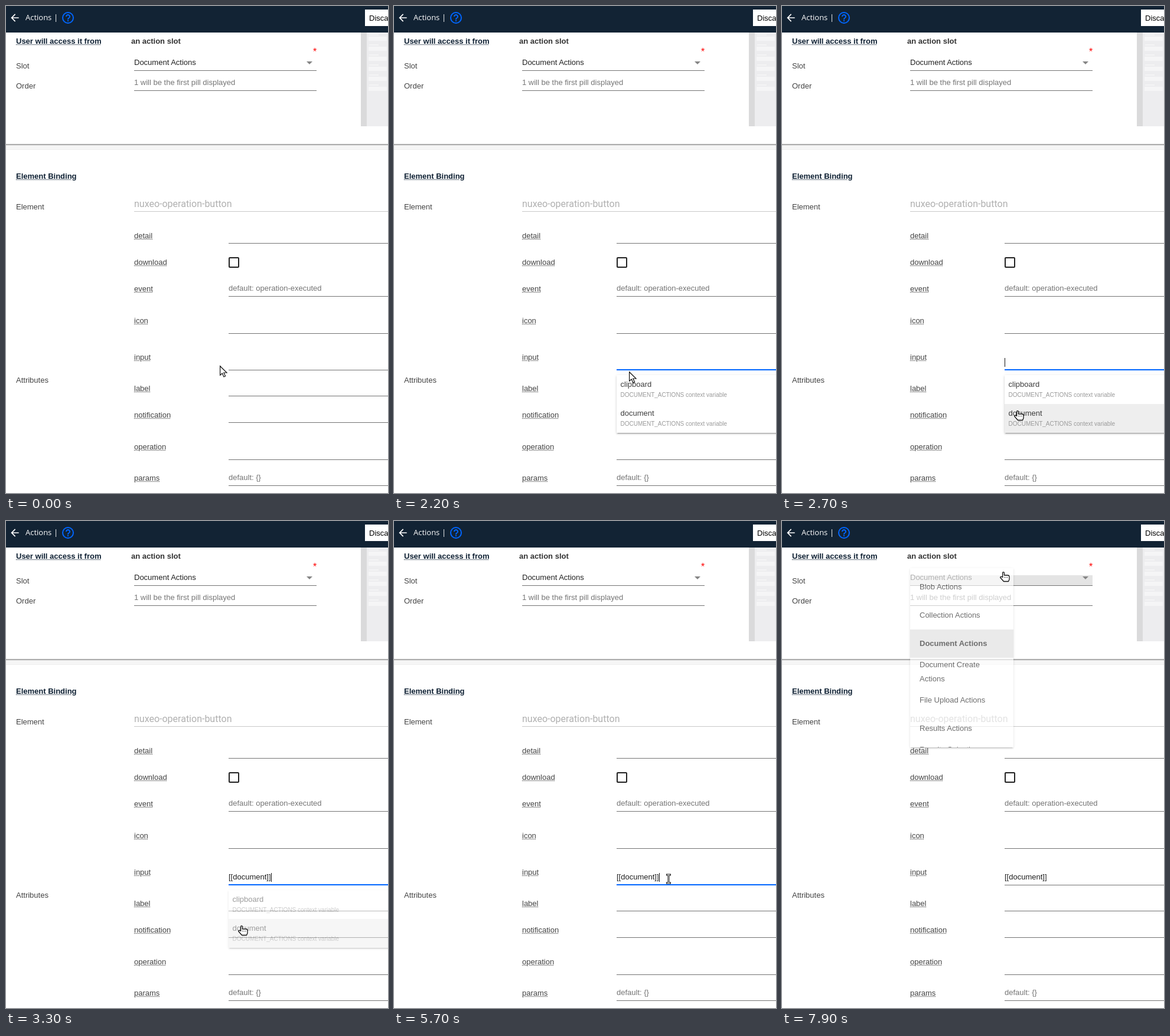
Write an HTML page that moves like this. It is 647 px wide and 826 px high and loops after 8 s.

```html
<!DOCTYPE html>
<html lang="en">
<head>
<meta charset="utf-8">
<title>Action slot form</title>
<style>
html, body { margin: 0; width: 100%; height: 100%; overflow: hidden; background: #fff; }
#stage { position: relative; width: 647px; height: 826px; overflow: hidden;
  font: 13px/15px "Liberation Sans", Arial, sans-serif; color: #444; }
#stage div, #stage svg { position: absolute; }
.text { white-space: nowrap; }
.head { font-weight: bold; color: #0e2033; }
.abbr { text-decoration: underline dotted; }
.hint { color: #757575; }
.value { color: #212121; }
.small { font-size: 10px; color: #9a9a9a; }
.shadow { box-shadow: 0 2px 2px rgba(0,0,0,.14), 0 1px 5px rgba(0,0,0,.12), 0 3px 1px -2px rgba(0,0,0,.2); }
#popup { left: 377px; top: 626px; width: 400px; height: 98px; background: #fff; color: #3c3c3c; }
#menu { left: 217px; top: 80px; width: 175px; height: 304px; overflow: hidden;
  background: #fff; color: #212121; opacity: .65; }
#menu p { margin: 0; padding: 0 16px; height: 48px; line-height: 24px; display: flex; align-items: center; }
#menu p:first-child { margin-top: 8px; }
#menu .chosen { background: #e0e0e0; font-weight: bold; }
</style>
</head>
<body>
<div id="stage"></div>
<script>
const stage = document.getElementById('stage');

function add(html, parent = stage) {
  parent.insertAdjacentHTML('beforeend', html);
  return parent.lastElementChild;
}
function box(x, y, w, h, color, parent, style = '') {
  return add(`<div style="left:${x}px;top:${y}px;width:${w}px;height:${h}px;background:${color};${style}"></div>`, parent);
}
function text(x, baseline, str, cls = '', parent, style = '') {
  return add(`<div class="text ${cls}" style="left:${x}px;top:${baseline - 12}px;${style}">${str}</div>`, parent);
}
function show(el, on) { el.style.display = on ? '' : 'none'; }

// Header
box(0, 0, 647, 45, '#122334');
add(`<svg width="130" height="45">
  <path transform="translate(5 10) scale(.833)" fill="#fff" d="M20 11H7.83l5.59-5.59L12 4l-8 8 8 8 1.41-1.41L7.83 13H20v-2z"/>
  <circle cx="105" cy="20" r="9" fill="none" stroke="#06f" stroke-width="2"/>
  <path fill="#06f" transform="translate(93 8)" d="M11 18h2v-2h-2zM12 6c-2.21 0-4 1.79-4 4h2c0-1.1.9-2 2-2s2 .9 2 2c0 2-3 1.75-3 5h2c0-2.25 3-2.5 3-5 0-2.21-1.79-4-4-4z"/>
</svg>`);
const bar = 'color:#fff;font-family:"Open Sans","Noto Sans",sans-serif'.replace(/"/g, "'");
text(33, 24, 'Actions', '', stage, bar);
text(81, 24, '|', '', stage, bar);
box(608, 6, 60, 28, '#fff');
text(615, 25, 'Discard', '', stage, 'color:#000');

// Slot section
text(17, 64, 'User will access it from', 'head abbr');
text(212, 64, 'an action slot', 'head', stage, 'color:#333');
text(520, 82, '*', '', stage, 'color:#f00;font-size:16px');
text(17, 106, 'Slot');
text(17, 140, 'Order');
const ripple = box(217, 92, 309, 17, '#e4e4e4');
text(217, 100, 'Document Actions', 'value');
text(217, 134, '1 will be the first pill displayed', 'hint');
box(217, 109, 309, 1, '#737373');
box(217, 143, 309, 1, '#737373');
add('<svg style="left:509px;top:94px" width="10" height="5"><path d="M0 0H10L5 5z" fill="#858585"/></svg>');

// Layout thumbnail
box(601, 45, 46, 159, '#ededef');
box(601, 45, 10, 159, '#dadadb');
for (let y = 48; y < 145; y += 17) {
  box(615, y, 16, 2, '#f4f4f5');
  box(614, y + 4, 31, 7, '#f5f5f6');
}

// Section divider
box(0, 234, 647, 10, 'linear-gradient(#a4a4a4 1px,#b6b6b6 1px 2px,#e4e4e4 2px 3px,#f6f6f6 3px 9px,#eee 9px)');

// Binding section
text(17, 293, 'Element Binding', 'head abbr');
text(17, 345, 'Element');
text(217, 340, 'nuxeo-operation-button', '', stage, 'font-family:Roboto,sans-serif;font-size:16px;color:#b0b0b0');
box(217, 348, 430, 1, '#c8c8c8');
text(17, 639, 'Attributes');
const fields = [
  ['detail', 394, 402], ['download', 439], ['event', 484, 492, 'default: operation-executed'],
  ['icon', 538, 555], ['input', 600, 617], ['label', 653, 661], ['notification', 698, 706],
  ['operation', 752, 769], ['params', 805, 813, 'default: {}']
];
for (const [name, y, line, hint] of fields) {
  text(217, y, name, 'abbr');
  if (line) box(377, line, 270, 1, '#737373');
  if (hint) text(377, y - 1, hint, 'hint');
}
box(377, 426, 14, 14, '#fff', stage, 'border:2px solid #212121;border-radius:2px');

// Input state
const focusLine = box(377, 616, 270, 2, '#06f');
const value = text(377, 608, '[[document]]', 'value');
const caret = box(377, 597, 1, 15, '#111');

// Suggestions
const popup = add('<div id="popup" class="shadow"></div>');
const rows = ['clipboard', 'document'].map((name, i) => {
  const row = box(0, i * 49, 400, 49, '#fff', popup);
  text(6.5, 20, name, '', row);
  text(6.5, 38, 'DOCUMENT_ACTIONS context variable', 'small', row);
  return row;
});

// Slot menu
const slots = ['Blob', 'Collection', 'Document', 'Document Create', 'File Upload', 'Results', 'Results Selection'];
const menu = add('<div id="menu" class="shadow">' +
  slots.map((s, i) => `<p${i === 2 ? ' class="chosen"' : ''}>${s} Actions</p>`).join('') + '</div>');

// Pointers
const beam = 'M-2.5-7H2.5M0-7V7M-2.5 7H2.5';
const shapes = {
  arrow: '<path d="M.6.8V16.2L4.2 13 7 19 9.6 17.8 6.8 12H12z" fill="#fff" stroke="#111" stroke-width="1.2"/>',
  beam: `<g fill="none" stroke-linecap="square"><path d="${beam}" stroke="#111" stroke-width="3"/>
    <path d="${beam}" stroke="#fff"/></g>`,
  hand: `<path d="M4.6 9.5V2a1.4 1.4 0 0 1 2.8 0V6H14q2 .5 2 2.5V13l-1.5 3.5H6.5L.8 10q0-2 2-1.5z"
    fill="#fff" stroke="#111" stroke-width="1.3" stroke-linejoin="round"/>
    <path d="M7 9.5h1.2m1.3 0h1.2m1.3 0h1.2" stroke="#111"/>`
};
const layer = add('<svg width="647" height="826">' +
  Object.values(shapes).map(s => `<g>${s}</g>`).join('') + '</svg>');
const pointers = Object.fromEntries(Object.keys(shapes).map((k, i) => [k, layer.children[i]]));

// time, pointer, x, y
const path = [
  [0, 'arrow', 362, 610], [600, 'arrow', 362, 610], [900, 'beam', 384, 609], [1100, 'beam', 398, 609],
  [2100, 'beam', 398, 609], [2200, 'arrow', 398, 620], [2300, 'hand', 393, 652], [2400, 'hand', 393, 681],
  [2600, 'hand', 393, 681], [2700, 'hand', 393, 686], [3300, 'hand', 393, 686], [3400, 'beam', 400, 690],
  [3700, 'beam', 400, 690], [4300, 'beam', 463, 615], [4700, 'beam', 463, 615], [4800, 'beam', 465, 607],
  [6600, 'beam', 465, 607], [6700, 'arrow', 456, 565], [6900, 'arrow', 408, 280], [7100, 'hand', 370, 83],
  [7200, 'hand', 370, 83], [7300, 'hand', 369, 86], [8000, 'hand', 369, 86]
];

function movePointer(t) {
  const i = path.findLastIndex(k => k[0] <= t);
  const [t0, kind, x0, y0] = path[i];
  const [t1, , x1, y1] = path[i + 1];
  const p = (t - t0) / (t1 - t0);
  for (const k in pointers) show(pointers[k], k === kind);
  const x = Math.round(x0 + (x1 - x0) * p), y = Math.round(y0 + (y1 - y0) * p);
  pointers[kind].setAttribute('transform', `translate(${x} ${y})`);
}

function render(t) {
  const filled = t >= 3300, focused = t >= 1400 && t < 7600;
  show(focusLine, focused);
  focusLine.style.clipPath = t < 1500 ? 'inset(0 0 0 60%)' : 'none';
  show(value, filled);

  const blink = filled ? (t - 3300) % 1200 < 600 : t < 2000 || t >= 2700;
  show(caret, focused && blink);
  caret.style.left = (filled ? 449 : 377) + 'px';

  show(popup, t >= 1500 && t < 3400);
  popup.style.opacity = t < 1600 || t >= 3300 ? .5 : 1;
  const hovered = t < 2300 ? -1 : t < 2700 ? 0 : 1;
  rows.forEach((row, i) => row.style.background = i === hovered ? '#eee' : '#fff');

  show(ripple, t >= 7600);
  ripple.style.clipPath = t < 7900 ? `circle(${t < 7700 ? 45 : 125}px at 158px 0)` : 'none';
  show(menu, t >= 7900);
  movePointer(t);
}

function tick(now) {
  render(Math.floor(now % 8000 / 100) * 100);
  requestAnimationFrame(tick);
}
render(0);
requestAnimationFrame(tick);
</script>
</body>
</html>
```
